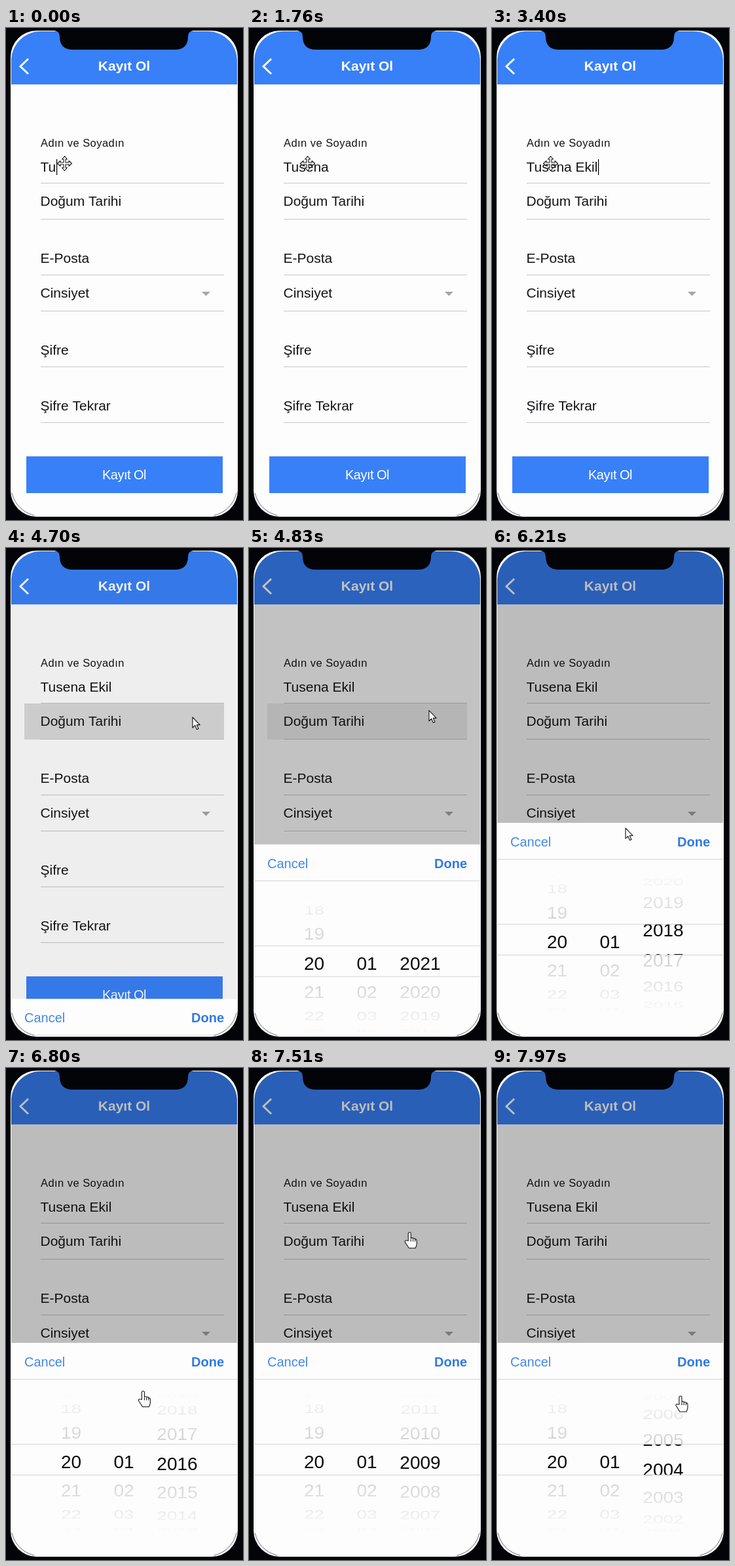
Animation of 362x750 px, one loop 8 s. Source, as an HTML page with a canvas:

```html
<!DOCTYPE html>
<html lang="tr">
<head>
<meta charset="utf-8">
<title>Kayıt Ol</title>
<style>
  html, body { margin: 0; width: 100%; height: 100%; overflow: hidden; background: #030408; }
  canvas { display: block; width: 362px; height: 750px; }
</style>
</head>
<body>
<canvas id="stage"></canvas>
<script>
const W = 362, H = 750, LOOP = 8000;
const FONT = '"Liberation Sans", Arial, sans-serif';
const BLUE = '#3880f8', PAPER = '#fdfdfe', INK = '#141416', BEZEL = '#030408';
const canvas = document.getElementById('stage');
const ctx = canvas.getContext('2d');
const dpr = window.devicePixelRatio || 1;
canvas.width = W * dpr;
canvas.height = H * dpr;

const lerp = (a, b, u) => a + (b - a) * u;
const clamp = u => Math.max(0, Math.min(1, u));
const smooth = u => u * u * (3 - 2 * u);

// Typing: time at which each further letter appears
const NAME = 'Tusena Ekil';
const KEYS = [0, 0, 400, 800, 920, 1260, 2100, 2480, 2730, 3150, 3400];

// Pointer stops: time, x, y
const STOPS = [
  [3900, 89, 206], [4520, 285, 258], [4720, 285, 258], [5080, 240, 212],
  [5180, 240, 212], [5720, 214, 579], [5850, 214, 579], [6310, 202.6, 406],
  [6480, 202.6, 406], [7080, 215, 565], [7250, 215, 565], [7560, 247.5, 228],
  [8050, 291, 522]
];

// Year wheel drags: press, release, row at press, y at press, resting row, decay
const DRAGS = [
  { from: 5850, to: 6310, row: 0, y: 579, rest: 5, decay: 6 },
  { from: 7250, to: 7560, row: 5, y: 565, rest: 17.4, decay: 4.9 }
];
const ROW = 45, STEP = 24.5 * Math.PI / 180, RADIUS = 107;

const rim = new Path2D();
rim.roundRect(7, 4, 347, 741, 40);
const screen = new Path2D();
screen.roundRect(8, 5, 345, 739, 45);
const arrow = new Path2D('M0 0V16L3.7 12.5L6.5 18.5L9 17.5L6.3 11.6H11.2Z');
const hand = new Path2D('M-2 12V1Q-2-1 0-1Q2-1 2 1V8Q4 6.5 5.5 8.5Q8 7.5 8.7 9.7Q11 9 11 12V17' +
  'Q10.5 20 9 23H-1Q-4 18-7 13.5Q-7 10.5-4 11.5Z');
const notch = new Path2D('M74 0V4Q82 5 82 13Q82 33 102 33H258Q278 33 278 13Q278 5 286 4V0Z');

// Cubic ease (.36,.66,.04,1)
function slideEase(x) {
  if (x <= 0) return 0;
  if (x >= 1) return 1;
  let lo = 0, hi = 1;
  for (let i = 0; i < 24; i++) {
    const s = (lo + hi) / 2, r = 1 - s;
    if (3 * r * r * s * .36 + 3 * r * s * s * .04 + s * s * s < x) lo = s; else hi = s;
  }
  const r = 1 - lo;
  return 3 * r * r * lo * .66 + 3 * r * lo * lo + lo * lo * lo;
}

function pointerAt(t) {
  if (t <= STOPS[0][0]) return { x: STOPS[0][1], y: STOPS[0][2] };
  const i = STOPS.findIndex(s => s[0] > t);
  const a = STOPS[i - 1], b = STOPS[i];
  const u = smooth((t - a[0]) / (b[0] - a[0]));
  return { x: lerp(a[1], b[1], u), y: lerp(a[2], b[2], u) };
}

function yearRow(t) {
  const d = DRAGS.filter(g => t >= g.from).pop();
  if (!d) return 0;
  const row = d.row + (d.y - pointerAt(Math.min(t, d.to)).y) / ROW;
  if (t <= d.to) return row;
  return d.rest + (row - d.rest) * Math.exp(-d.decay * (t - d.to) / 1000);
}

function text(str, x, y, size, color, { bold = false, space = 0, align = 'left' } = {}) {
  ctx.font = `${bold ? 'bold ' : ''}${size}px ${FONT}`;
  ctx.letterSpacing = space + 'px';
  ctx.textAlign = align;
  ctx.fillStyle = color;
  ctx.fillText(str, x, y);
}

function rect(x, y, w, h, color) {
  ctx.fillStyle = color;
  ctx.fillRect(x, y, w, h);
}

const label = (str, y) => text(str, 52.5, y, 21, INK);

function caretOn(t) {
  if (t > 4560) return false;
  const last = KEYS.filter(k => k <= t).pop();
  return last === 0 || (t - last) % 1000 < 500;
}

function drawForm(t) {
  rect(0, 0, W, H, PAPER);
  rect(0, 0, W, 86, BLUE);
  ctx.strokeStyle = '#fff';
  ctx.lineWidth = 3;
  ctx.beginPath();
  ctx.moveTo(34, 47);
  ctx.lineTo(22, 58.5);
  ctx.lineTo(34, 70);
  ctx.stroke();
  text('Kayıt Ol', 180.5, 65, 21, '#fff', { bold: true, align: 'center' });

  const press = clamp((t - 4570) / 60) * (1 - clamp((t - 4740) / 160));
  if (press > 0) rect(28, 237, 305, 55, `rgba(0,0,0,${.14 * press})`);

  text('Adın ve Soyadın', 53, 181, 16.5, INK, { space: .45 });
  const typed = NAME.slice(0, KEYS.filter(k => k <= t).length);
  label(typed, 219);
  if (caretOn(t)) rect(Math.round(53 + ctx.measureText(typed).width), 200, 1.2, 24, '#000');

  label('Doğum Tarihi', 271);
  label('E-Posta', 358);
  label('Cinsiyet', 411);
  label('Şifre', 498);
  label('Şifre Tekrar', 583);
  for (const y of [236, 291, 376, 431, 516, 601]) rect(53, y, 280, 1, '#c6c6c8');

  ctx.fillStyle = '#a6a6a8';
  ctx.beginPath();
  ctx.moveTo(299, 402);
  ctx.lineTo(312, 402);
  ctx.lineTo(305.5, 408.5);
  ctx.fill();

  rect(31, 653, 300, 56, BLUE);
  text('Kayıt Ol', 180.5, 688, 20, '#fff', { space: -.5, align: 'center' });
}

function drawWheel(x, row, count, format) {
  const first = Math.max(0, Math.ceil(row - 3.5));
  const last = Math.min(count - 1, Math.floor(row + 3.5));
  for (let k = first; k <= last; k++) {
    const angle = (k - row) * STEP;
    ctx.save();
    ctx.translate(x, 600.5 + RADIUS * Math.sin(angle));
    ctx.scale(1, Math.cos(angle));
    text(format(k), 0, 9.3, 28, '#0c0c0e', { align: 'center' });
    ctx.restore();
  }
}

// White veil from the selection line (from) to full cover (to), filled up to end
function veil(from, to, end) {
  const g = ctx.createLinearGradient(0, from, 0, to);
  g.addColorStop(0, 'rgba(253,253,254,.81)');
  g.addColorStop(1, 'rgba(253,253,254,1)');
  rect(0, from, W, end - from, g);
}

function drawPicker(t, p) {
  const two = k => String(k + 1).padStart(2, '0');
  ctx.save();
  ctx.translate(0, (1 - p) * 331);
  rect(0, 419, W, 331, PAPER);
  drawWheel(99.5, 19, 31, two);
  drawWheel(180, 0, 12, two);
  drawWheel(261.5, yearRow(t), 100, k => String(2021 - k));
  veil(573, 494, 475);
  veil(621, 714, H);
  for (const y of [474, 573, 620]) rect(0, y, W, 1, '#d4d4d8');
  text('Cancel', 28, 455, 20, '#3f88ea');
  text('Done', 333, 455, 20, '#3079e6', { bold: true, align: 'right' });
  ctx.restore();
}

function drawPointer(t) {
  const { x, y } = pointerAt(t);
  ctx.save();
  ctx.translate(x, y);
  ctx.fillStyle = '#fff';
  ctx.strokeStyle = '#141416';
  ctx.lineWidth = 1.1;
  ctx.lineJoin = 'round';
  let shape = arrow;
  if (t < 3920) {
    ctx.translate(.5, .5);
    shape = new Path2D();
    const arm = [[-1.5, -1.5], [-1.5, -6.5], [-4, -6.5], [0, -11], [4, -6.5], [1.5, -6.5]];
    for (let i = 0; i < 4; i++) {
      const c = [1, 0, -1, 0][i], s = [0, 1, 0, -1][i];
      for (const [px, py] of arm) shape.lineTo(px * c - py * s, px * s + py * c);
    }
    shape.closePath();
  } else if (t > 5200 && (y < 419 || y > 474)) {
    shape = hand;
  }
  ctx.fill(shape);
  ctx.stroke(shape);
  if (shape === hand) {
    ctx.beginPath();
    for (const px of [2, 5.3, 8.5]) {
      ctx.moveTo(px, 9);
      ctx.lineTo(px, 13);
    }
    ctx.stroke();
  }
  ctx.restore();
}

function drawCorners() {
  ctx.strokeStyle = 'rgba(20,20,24,.6)';
  ctx.lineWidth = 1;
  ctx.beginPath();
  ctx.arc(53, 699, 45, Math.PI * .57, Math.PI * .93);
  ctx.stroke();
  ctx.beginPath();
  ctx.arc(308, 699, 45, Math.PI * .07, Math.PI * .43);
  ctx.stroke();
}

function draw(t) {
  ctx.setTransform(dpr, 0, 0, dpr, 0, 0);
  rect(0, 0, W, H, BEZEL);
  ctx.fillStyle = '#fff';
  ctx.fill(rim);
  const p = slideEase((t - 4664) / 400);
  ctx.save();
  ctx.clip(screen);
  drawForm(t);
  if (p > 0) {
    rect(0, 0, W, H, `rgba(0,0,0,${.01 + .25 * p})`);
    drawPicker(t, p);
  }
  ctx.restore();
  drawCorners();
  ctx.fillStyle = BEZEL;
  ctx.fill(notch);
  drawPointer(t);
}

let start;
function tick(now) {
  start ??= now;
  draw((now - start) % LOOP);
  requestAnimationFrame(tick);
}
requestAnimationFrame(tick);
</script>
</body>
</html>
```
